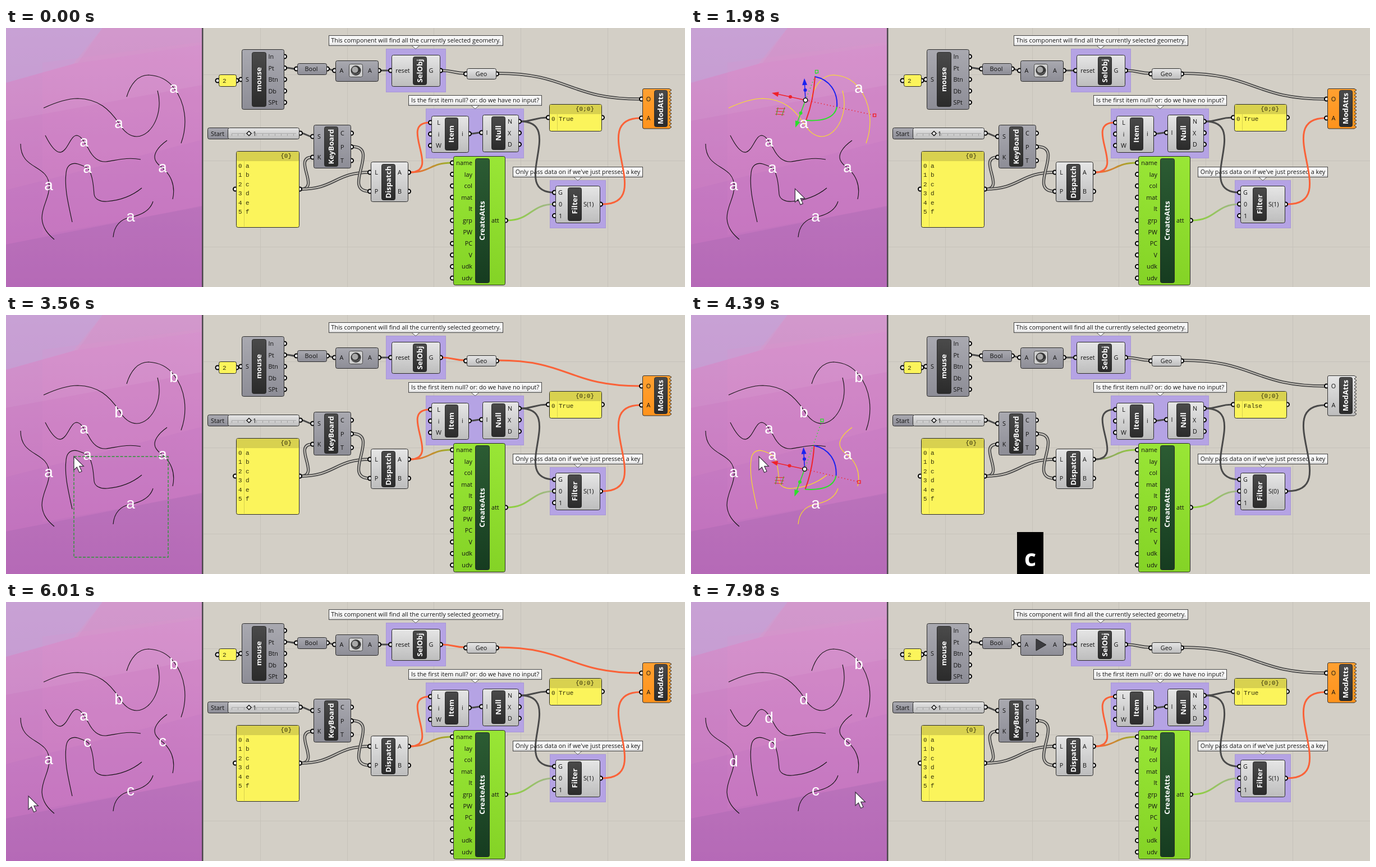
Write an HTML page that moves like this. It is 1210x463 px and loops after 8 s.

```html
<!DOCTYPE html>
<html lang="en">
<head>
<meta charset="utf-8">
<title>Keyboard attributes</title>
<style>
html, body { margin: 0; width: 100%; height: 100%; overflow: hidden; background: #d3cfc6; }
svg { display: block; width: 1210px; height: 463px; }
text { font: 10.8px "Open Sans", "Noto Sans", sans-serif; fill: #111; white-space: pre; }
.mono { font: 11px "Liberation Mono", monospace; fill: #33300a; }
.title { font-weight: 700; font-size: 13.2px; fill: #fff; text-anchor: middle; }
.tag { font: 28px "Liberation Sans", sans-serif; fill: #fff; text-anchor: middle; }
.key { font-weight: 700; font-size: 41px; fill: #fff; text-anchor: middle; }
.mid { text-anchor: middle; }
.end { text-anchor: end; }
</style>
</head>
<body>
<svg id="stage" viewBox="0 0 1210 463" xmlns="http://www.w3.org/2000/svg"></svg>
<script>
const ORANGE = '#fa6238', DARK = '#4a4a4a', CANVAS = '#d3cfc6';
const stage = document.getElementById('stage');

// ---- markup helpers ----
const rect = (x, y, w, h, fill, extra = '') =>
  `<rect x="${x}" y="${y}" width="${w}" height="${h}" fill="${fill}" ${extra}/>`;
const path = (d, fill, stroke = 'none', width = 1, extra = '') =>
  `<path d="${d}" fill="${fill}" stroke="${stroke}" stroke-width="${width}" ${extra}/>`;
const text = (x, y, s, cls = '', extra = '') =>
  `<text x="${x}" y="${y}" class="${cls}" ${extra}>${s}</text>`;
const dot = (x, y, r, fill, extra = '') => `<circle cx="${x}" cy="${y}" r="${r}" fill="${fill}" ${extra}/>`;
const group = (id, body, extra = '') => `<g id="${id}" ${extra}>${body}</g>`;
const grip = (x, y) => dot(x, y, 3.5, '#fff', 'stroke="#000" stroke-width="2"');
const gradient = (id, from, to, axis = 'x2="0" y2="1"') =>
  `<linearGradient id="${id}" ${axis}><stop stop-color="${from}"/><stop offset="1" stop-color="${to}"/></linearGradient>`;
const wireGradient = (id, x1, x2, from, to) =>
  gradient(id, from, to, `gradientUnits="userSpaceOnUse" x1="${x1}" y1="0" x2="${x2}" y2="0"`);

function wirePath(x1, y1, x2, y2) {
  const pull = Math.max(Math.abs(x2 - x1) * .5, Math.abs(y2 - y1) * .64);
  return `M${x1},${y1}C${x1 + pull},${y1} ${x2 - pull},${y2} ${x2},${y2}`;
}
const wire = (ends, color = DARK, width = 3) => path(wirePath(...ends), 'none', color, width);
const doubleWire = ends => wire(ends, DARK, 5.4) + wire(ends, CANVAS, 1.8);

// Outlined box with its one-pixel border on whole pixels.
const box = (x, y, w, h, fill) =>
  rect(Math.floor(x) + .5, Math.floor(y) + .5, Math.floor(w) - 1, Math.floor(h) - 1, fill, 'rx="3" stroke="#2a2a2a"');
function bar(x, y, w, h, name, fill = 'url(#bar)') {
  const cx = x + w / 2, cy = y + h / 2;
  return box(x, y, w + 1, h, fill) +
    text(cx, cy + 4.8, name, 'title', `transform="rotate(-90 ${cx} ${cy})"`);
}
function node(x, y, w, h, fill, { ins = [], outs = [], inX, outX, inCls = 'mid', title }) {
  return ins.map(([, py]) => grip(x - 1.5, py)).join('') +
    outs.map(([, py]) => grip(x + w + 1.5, py)).join('') +
    box(x, y, w + 1, h + 1, `url(#${fill})`) +
    ins.map(([s, py]) => text(inX, py + 4, s, inCls)).join('') +
    outs.map(([s, py]) => text(outX, py + 4, s)).join('') +
    (title ? bar(...title) : '');
}
function comment(x, y, w, tip, s) {
  return path(`M${tip - 7},${y + 18}L${tip},${y + 24}L${tip + 7},${y + 18}Z`, '#fff', '#555') +
    rect(x, y, w, 18, '#f7f7f7', 'stroke="#444"') + rect(x + .5, y + 14.5, w - 1, 3, '#dedede') +
    text(x + w / 2, y + 12.6, s, 'mid');
}
function panel(x, y, w, h, head, split, gripY) {
  return grip(x - 1.5, gripY) + grip(x + w + 1.5, gripY) + box(x, y, w + 1, h + 1, '#fbf45b') +
    rect(x + 1, y + 1, w - 1, 17, '#d8d14f', 'rx="2"') +
    rect(split, y + 18, 1, h - 19, '#d8d14f') + text(x + w - 13, y + 12, head, 'mono end');
}
const column = (names, y, step) => names.map((s, i) => [s, y + step * i]);

// ---- drawing viewport ----
const curves = [
  ['M67,143C95,130 112,126 128,126C165,127 184,145 201,170C208,182 219,194 233,194C261,193 281,150 270,112', 201, 170],
  ['M215,123C222,100 235,84 254,84C275,85 290,95 299,107C319,132 325,170 312,206', 299, 107],
  ['M70,192C78,208 88,224 98,222C110,219 115,192 126,192C135,193 140,206 147,216C153,228 162,240 178,239C196,237 215,230 240,235', 139, 203],
  ['M26,207C26,256 77,242 77,284C77,304 64,318 64,340C65,357 74,368 86,378', 76, 281],
  ['M118,347C110,310 104,285 107,260C108,245 117,240 128,243C137,246 143,248 147,252C155,265 156,285 157,297C158,306 168,311 180,310C205,308 225,300 242,286', 145, 250],
  ['M287,201C270,213 262,226 266,236C270,245 277,248 281,252C292,262 303,280 297,306', 279, 249],
  ['M191,374C193,350 207,341 223,338C242,334 257,326 262,310', 222, 337],
];

function viewport() {
  const tint = (points, fill, a) => `<polygon points="${points}" fill="${fill}" opacity="${a}"/>`;
  return rect(0, 0, 349, 463, 'url(#sky)') +
    tint('0,0 172,0 128,62 0,98', '#c4aadb', .55) +
    tint('172,0 349,0 349,30 120,64', '#d69acb', .5) +
    tint('0,98 120,64 349,30 349,102 0,166', '#da8fcb', .35) +
    tint('65,62 349,25 349,320 65,370', '#e08acb', .15) +
    tint('0,166 349,102 349,200 0,290', '#d47cc4', .35) +
    tint('0,290 349,200 349,318 0,387', '#c873c1', .4) +
    tint('0,387 349,318 349,463 0,463', '#b066b4', .4);
}

// Three rounds: select curves, press a key, labels change.
const rounds = [
  { key: 'b', picks: [0, 1], press: 950, release: 1185, click: [1185, 1330], pick: 1400, drop: 3040,
    orange: [1010, 1800], overlay: [1990, 2975], busy: [2230, 2450], relabel: 2250,
    origin: [204, 129], ends: [123, 27, 20, -51], plate: [578, 53], ink: '#23603c' },
  { key: 'c', picks: [4, 5, 6], press: 3050, release: 3810, click: [3810, 3940], pick: 3880, drop: 5230,
    orange: [3100, 3950], overlay: [4170, 5155], busy: [4390, 4610], relabel: 4410,
    origin: [202.5, 275.5], ends: [97, 23, 31, -87], plate: [581, 47], ink: '#2c9636' },
  { key: 'd', picks: [0, 2, 3, 4], press: 5240, release: 5880, click: [5880, 6010], pick: 6080, drop: 7890,
    orange: [5300, 6150], overlay: [6800, 7850], busy: [6890, 7200], relabel: 6900,
    origin: [139, 228], ends: [114, 26, 52, -132], plate: [580, 51], ink: '#2c9636' },
];

function gumball({ origin: [ox, oy], ends: [rx, ry, gx, gy] }, hover) {
  const red = '#f0222a', green = '#2be02b', blue = '#1a22f0';
  const line = (x, y, color, extra = '') => path(`M0,0L${x},${y}`, 'none', color, 1.6, extra);
  const arrow = (x, y, color) => line(x * .9, y * .9, color) +
    path('M0,0L-12,-4.5V4.5Z', color, 'none', 1,
      `transform="translate(${x} ${y}) rotate(${Math.atan2(y, x) * 180 / Math.PI})"`);
  const square = (x, y, color) => rect(x - 2.5, y - 2.5, 5, 5, 'none', `stroke="${color}" stroke-width="1.3"`);
  const dots = 'stroke-dasharray="1.4 4.2"';
  const grid = hover
    ? path('M-8,-4L-5,5L8,7L8,-5ZM-7,1L8,2M0,-5L1,6', 'none', '#111', 1.2)
    : path('M-7,-5L9,-5M-8,0L8,1M-9,5L7,6', 'none', red, 1.2) + path('M-4,-7L-7,7M8,-7L3,8', 'none', '#5a9a30', 1.2);
  return `<g transform="translate(${ox} ${oy})">` +
    line(rx, ry, red, dots) + line(gx, gy, green, dots) + square(rx, ry, red) + square(gx, gy, green) +
    path('M17,-42C15,-10 9,15 1,36', 'none', red, 2) +
    path('M17,-42C42,-37 58,-16 56,12', 'none', blue, 2) +
    path('M56,12C52,32 30,38 1,36', 'none', green, 2) +
    arrow(-60, -13, hover ? '#111' : red) + arrow(-18, 49, hover ? '#111' : green) + arrow(-2, -39, blue) +
    dot(-27, -6, 3, red) + dot(-8.5, 23, 3, green) + dot(-.5, -18, 3, blue) +
    dot(0, 0, 3.7, '#fff', 'stroke="#111" stroke-width="1.6"') +
    `<g transform="translate(-45 20)">${grid}</g></g>`;
}

// ---- node canvas ----
function canvas() {
  const lines = [453, 608, 762, 917, 1072].map(x => rect(x, 0, 1, 463, '#c6c2ba')).join('') +
    [83, 237, 391].map(y => rect(352, y, 858, 1, '#c6c2ba')).join('');
  const frames = [[677.5, 37.5, 106, 77], [748.5, 144.5, 174, 88], [969.5, 272.5, 99, 85]]
    .map(b => rect(...b, '#b5a3e4', 'stroke="#a896d8"')).join('');
  const notes =
    comment(575.5, 13.5, 310, 730, 'This component will find all the currently selected geometry.') +
    comment(717.5, 120.5, 237, 836, 'Is the first item null? or: do we have no input?') +
    comment(903.5, 248.5, 231, 1019, "Only pass data on if we've just pressed a key");

  const toGeo = [776, 76, 819, 81], fromGeo = [876, 81, 1130, 127];
  const toItem = [720, 258, 755, 169], toName = [720, 258, 793, 241], toMod = [1063, 315, 1131, 161];
  const wires =
    [[411, 93, 417, 93], [498, 71, 517, 73], [573, 73, 585, 76], [665, 76, 685, 76], [525, 188, 546, 194],
     [827, 189, 847, 187], [917, 167, 965, 160], [917, 167, 977, 294]].map(e => wire(e)).join('') +
    [[525, 288, 546, 231], [525, 288, 648, 258], [617, 212, 648, 292]].map(doubleWire).join('') +
    wire([893, 344, 977, 315], 'url(#attWire)') +
    group('geoFull', doubleWire(toGeo) + doubleWire(fromGeo)) +
    group('geoEmpty', wire(toGeo, ORANGE) + wire(fromGeo, ORANGE)) +
    group('wiresIdle', wire(toName, 'url(#nameIdle)') + wire(toItem, ORANGE) + wire(toMod, ORANGE)) +
    group('wiresBusy', wire(toName, 'url(#nameBusy)') + wire(toItem) + wire(toMod));

  const toggle = node(587, 58, 76, 37, 'grey', { ins: [['A', 76]], outs: [['A', 76]], inX: 598, outX: 645 }) +
    group('swirl', rect(611.5, 64.5, 24, 23, '#cfcfcf', 'rx="3" stroke="#444"') + dot(623.5, 76, 9, '#353535') +
      dot(622, 74.5, 5.5, '#a8a8a8') + path('M616,80Q624,86 631,78', 'none', '#666', 1.5)) +
    group('play', path('M615,66L633,76.5L615,87Z', '#3c3c40', '#222', 1));

  const slider = grip(524.5, 188) + box(359, 178, 40, 21, 'url(#grey)') +
    box(395, 178, 128, 21, 'url(#light)') + text(365, 192.5, 'Start') +
    path('M402,188.5H517', 'none', '#aaa', 1) + path('M402,191H517', 'none', '#999', 3, 'stroke-dasharray="1 10"') +
    path('M433,184.5L437,188.5L433,192.5L429,188.5Z', '#fff', '#111', 1.5) + text(440, 192.5, '1');

  const list = panel(410, 220, 112, 136, '{0}', 424, 288) +
    [...'abcdef'].map((s, i) => text(414, 250 + 16.4 * i, i, 'mono') + text(427, 250 + 16.4 * i, s, 'mono')).join('');

  let edge = 'M1137,108.5H1182';
  for (let i = 0; i < 12; i++) edge += `L1186,${111 + 6 * i}L1182,${114 + 6 * i}`;
  const modAtts = grip(1132.5, 127) + grip(1132.5, 161) +
    path(edge + 'H1137Q1134.5,180 1134.5,177V111Q1134.5,108.5 1137,108.5Z', 'url(#orange)', '#333', 1, 'id="modBody"') +
    text(1145, 131, 'O', 'mid') + text(1145, 165, 'A', 'mid') + bar(1155, 111, 23, 66, 'ModAtts');

  const params = ['name', 'lay', 'col', 'mat', 'lt', 'grp', 'PW', 'PC', 'V', 'udk', 'udv'];
  const nodes =
    node(420, 38, 75, 107, 'grey', { ins: [['S', 92]], inX: 430, outX: 467.5,
      outs: column(['In', 'Pt', 'Btn', 'Db', 'SPt'], 51, 20.5), title: [438, 43, 25, 98, 'mouse'] }) +
    grip(377, 94) + grip(411, 94) + box(379, 83, 32, 22, '#fbf45b') + text(386, 97.5, '2', 'mono') +
    node(519, 63, 52, 20, 'grey', { ins: [['Bool', 73]], outs: [['', 73]], inX: 544 }) + toggle +
    node(687, 48, 86, 56, 'light', { ins: [['reset', 76]], outs: [['G', 76]], inX: 707, outX: 753.5,
      title: [725, 51, 24, 51, 'SelObj'] }) +
    node(821, 72, 52, 19, 'light', { ins: [['Geo', 82]], outs: [['', 82]], inX: 847 }) +
    node(758, 157, 66, 65, 'light', { ins: column(['L', 'i', 'W'], 169, 20.5), outs: [['i', 189]], inX: 771, outX: 812,
      title: [782, 160, 23, 59, 'Item'] }) +
    node(849, 155, 64, 66, 'light', { ins: [['I', 187]], outs: column(['N', 'X', 'D'], 167, 20.5), inX: 857, outX: 894,
      title: [865, 158, 24, 60, 'Null'] }) +
    slider +
    node(548, 173, 66, 77, 'grey', { ins: [['S', 194], ['K', 231]], outs: column(['C', 'P', 'T'], 188, 24.5), inX: 558,
      outX: 596, title: [567, 176, 24, 72, 'KeyBoard'] }) +
    list +
    node(650, 239, 66, 71, 'light', { ins: [['L', 258], ['P', 292]], outs: [['A', 258], ['B', 292]], inX: 660, outX: 698,
      title: [669, 243, 24, 65, 'Dispatch'] }) +
    node(797, 229, 92, 230, 'green', { ins: column(params, 241, 20.6), outs: [['att', 344]], inX: 831, inCls: 'end',
      outX: 865, title: [836, 233, 25, 223, 'CreateAtts', 'url(#greenBar)'] }) +
    node(979, 282, 79, 66, 'light', { ins: column(['G', '0', '1'], 294, 20.8), outs: [['', 315]], inX: 988, outX: 1029,
      title: [1001, 285, 24, 60, 'Filter'] }) + text(1029, 319, '', '', 'id="stream"') +
    panel(968, 136, 93, 48, '{0;0}', 982, 160) + text(972, 166, '0', 'mono') + text(985, 166, '', 'mono', 'id="nullText"') +
    modAtts;

  return rect(349, 0, 861, 463, CANVAS) + lines + rect(349, 0, 2.5, 463, '#4c474d') + frames + notes + wires + nodes;
}

stage.innerHTML = '<defs>' +
  gradient('sky', '#d098ce', '#b96bb8') + gradient('grey', '#a9a9b0', '#8d8d96') +
  gradient('light', '#e6e6e6', '#bdbdbd') + gradient('green', '#99e636', '#84d326') +
  gradient('orange', '#ffa030', '#ff931c') + gradient('bar', '#4a4a4a', '#2b2b2b') +
  gradient('greenBar', '#2c5c33', '#163c20') + wireGradient('attWire', 893, 977, '#8bd335', '#a3b391') +
  wireGradient('nameIdle', 720, 793, ORANGE, '#96b42c') + wireGradient('nameBusy', 720, 793, '#8d9470', '#93cf3e') +
  '</defs>' + viewport() +
  curves.map((c, i) => path(c[0], 'none', '#111', 1.1, `id="curve${i}"`)).join('') +
  rounds.map(r => group('gum' + r.key, gumball(r))).join('') + group('gumHover', gumball(rounds[2], true)) +
  curves.map((c, i) => text(c[1], 0, '', 'tag', `id="tag${i}"`)).join('') + canvas() +
  rounds.map(r => group('key' + r.key, rect(r.plate[0], 388, r.plate[1], 75, '#000') +
    text(r.plate[0] + r.plate[1] / 2, 449, r.key, 'key'))).join('') +
  rect(0, 0, 0, 0, 'none', 'id="marquee" stroke-width="1.4" stroke-dasharray="5 2.5"') +
  dot(0, 0, 17, '#e9c45c', 'id="click" opacity=".92"') +
  group('cursor', path('M0,0V24L5.4,19L9.6,28.5L14,26.5L9.8,17.3H17.4Z', '#fff', '#3a3040', 1.2));

// ---- motion ----
const el = {};
stage.querySelectorAll('[id]').forEach(e => { el[e.id] = e; });
const show = (id, on) => { el[id].style.display = on ? '' : 'none'; };
const within = (t, [a, b]) => t >= a && t < b;

const track = [
  [100, 828, 413], [450, 440, 225], [700, 192, 62], [880, 295, 40], [950, 295, 40], [1170, 141, 164], [1770, 141, 164],
  [2030, 190, 300], [2230, 190, 300], [2600, 281, 420], [2900, 281, 420], [2990, 289, 433], [3060, 289, 433],
  [3450, 121, 253], [4390, 121, 253], [4950, 145, 85], [5260, 145, 85], [5850, 40, 347], [6100, 40, 347],
  [6700, 95, 230], [6890, 95, 230], [7020, 101, 193], [7300, 101, 193], [7650, 280, 285], [7720, 280, 285],
  [7900, 293, 340], [8000, 293, 340],
];
function cursorAt(t) {
  const i = Math.max(1, track.findIndex(k => k[0] >= t));
  const [t0, x0, y0] = track[i - 1], [t1, x1, y1] = track[i];
  const u = Math.min(1, Math.max(0, (t - t0) / (t1 - t0))), e = u * u * (3 - 2 * u);
  return [x0 + (x1 - x0) * e, y0 + (y1 - y0) * e];
}
const playing = [[950, 1010], [1770, 1840], [3040, 3100], [3810, 3880], [5230, 5290], [6080, 6150], [7930, 8000]];
const LAG = 95; // the marquee trails the cursor

function render(t) {
  const [cx, cy] = cursorAt(t);
  const busy = rounds.some(r => within(t, r.busy));
  const empty = rounds.some(r => within(t, r.orange));
  const hover = within(t, [6960, 7350]);
  const play = playing.some(p => within(t, p));

  show('cursor', t >= 100);
  el.cursor.setAttribute('transform', `translate(${cx} ${cy})`);
  el.click.setAttribute('transform', `translate(${cx} ${cy})`);
  show('click', rounds.some(r => within(t, r.click)));

  const drag = rounds.find(r => within(t, [r.press + LAG, r.release + LAG]));
  show('marquee', drag);
  if (drag) {
    const [ax, ay] = cursorAt(drag.press), [bx, by] = cursorAt(t - LAG);
    const area = { x: Math.min(ax, bx), y: Math.min(ay, by), width: Math.abs(ax - bx), height: Math.abs(ay - by), stroke: drag.ink };
    for (const k in area) el.marquee.setAttribute(k, area[k]);
  }

  curves.forEach((c, i) => {
    const picked = rounds.some(r => r.picks.includes(i) && within(t, [r.pick, r.drop]));
    el['curve' + i].setAttribute('stroke', picked ? '#ffe51f' : '#111');
    const letter = rounds.reduce((s, r) => r.picks.includes(i) && t >= r.relabel ? r.key : s, 'a');
    el['tag' + i].textContent = letter;
    el['tag' + i].setAttribute('y', c[2] + ('bd'.includes(letter) ? 12.5 : 9));
  });
  rounds.forEach(r => {
    show('gum' + r.key, within(t, [r.pick, r.drop]) && !(r.key === 'd' && hover));
    show('key' + r.key, within(t, r.overlay));
  });
  show('gumHover', hover);

  show('geoEmpty', empty);
  show('geoFull', !empty);
  show('wiresBusy', busy);
  show('wiresIdle', !busy);
  show('play', play);
  show('swirl', !play);
  el.modBody.setAttribute('fill', busy ? 'url(#light)' : 'url(#orange)');
  el.stream.textContent = busy ? 'S(0)' : 'S(1)';
  el.nullText.textContent = busy ? 'False' : 'True';
}

const start = performance.now();
function tick() {
  render((performance.now() - start) % 8000);
  requestAnimationFrame(tick);
}
render(0);
requestAnimationFrame(tick);
</script>
</body>
</html>
```
